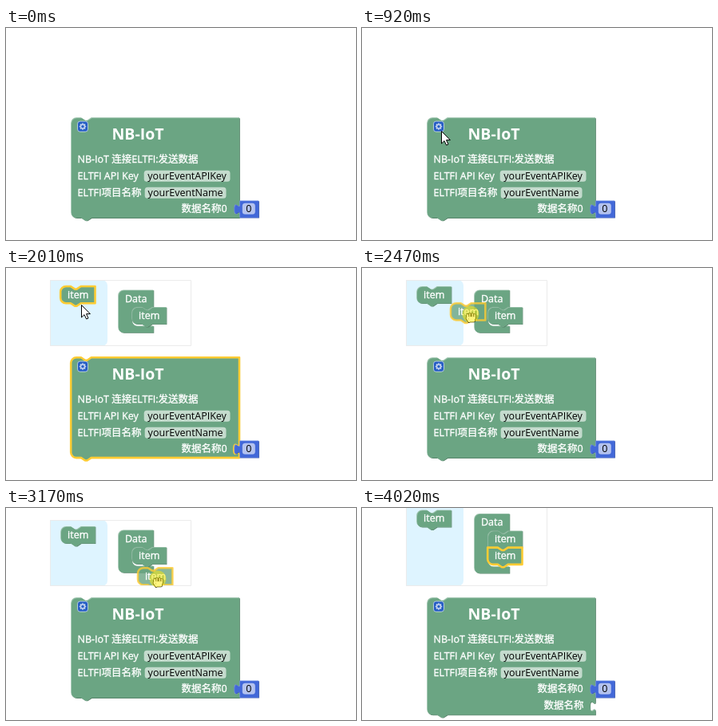
Animation of 438 by 266 pixels, one loop 4720 ms. Source, as an HTML page with a canvas:

```html
<!DOCTYPE html>
<html lang="zh-CN">
<head>
<meta charset="utf-8">
<title>Block mutator</title>
<style>
  html, body { margin: 0; width: 100%; height: 100%; overflow: hidden; background: #fff; }
  canvas { display: block; width: 438px; height: 266px; }
</style>
</head>
<body>
<canvas id="stage"></canvas>
<script>
const WIDTH = 438, HEIGHT = 266, LOOP = 4720, SCALE = 0.85;
const canvas = document.getElementById('stage');
const ctx = canvas.getContext('2d');
const ratio = window.devicePixelRatio || 1;
canvas.width = WIDTH * ratio;
canvas.height = HEIGHT * ratio;

const FAMILY = '"Open Sans", "Noto Sans CJK SC", "Noto Sans CJK", sans-serif';
const GREEN = { fill: '#6ba583', light: '#97c0a8', dark: '#568469' };
const BLUE = { fill: '#4268d8', light: '#6f8de2', dark: '#3453ad' };
const YELLOW = '#fc3';

// Moments at which the picture switches state.
const AT = { hover: 1080, press: 1250, click: 1390, open: 1620, leave: 1850, pick: 2010,
  grab: 2160, drag: 2310, drop: 3400, grow: 3470, arrow: 3550, gone: 4020 };

// Each walk spreads its points evenly from start to end and holds the last one.
const WALKS = [
  { start: 460, end: 920, points: [[270, 221], [226, 196], [181, 172], [138, 151], [108, 138], [92, 132], [99, 129]] },
  { start: 990, end: 1080, points: [[97, 125], [95, 121]] },
  { start: 1850, end: 2010, points: [[99, 95], [97, 66], [94, 46]] },
  { start: 2160, end: 2160, points: [[95, 42]] },
  { start: 2310, end: 2710, points: [[99, 43], [116, 49], [136, 58], [156, 69], [170, 77], [175, 79]] },
  { start: 2860, end: 3320, points: [[177, 80], [182, 84], [188, 89], [192, 92], [190, 89], [187, 85], [186, 84]] },
  { start: 3550, end: 3945, points: [[186, 81], [186, 81], [205, 94], [268, 140], [345, 196], [410, 241]] }
];

function cursorAt(t) {
  const walk = WALKS.filter(w => t >= w.start).pop();
  if (!walk || t >= AT.gone) return null;
  const last = walk.points.length - 1;
  const progress = walk.end > walk.start ? (t - walk.start) / (walk.end - walk.start) : 1;
  return walk.points[Math.min(last, Math.floor(progress * last + 1e-6))];
}

// Outlines in block units, drawn at SCALE.
const NOTCH = 'l6,4 3,0 6,-4', NOTCH_BACK = 'l-6,4 -3,0 -6,-4';
const SOCKET = 'c0,10 -8,-8 -8,7.5 s8,-2.5 8,7.5';
const ROUND_TOP = 'M0,8 A8,8 0 0 1 8,0', ROUND_BOTTOM = 'H8 a8,8 0 0 1 -8,-8 z';

function stackOutline(width, height, { squareTop, squareBottom, right = '' } = {}) {
  return `${squareTop ? 'M0,0' : ROUND_TOP} H15 ${NOTCH} H${width} ${right} V${height} ` +
    `H30 ${NOTCH_BACK} ${squareBottom ? 'H0 z' : ROUND_BOTTOM}`;
}

function containerOutline(count) {
  const floor = 28 + count * 25;
  return `${ROUND_TOP} H52 V25 H50 ${NOTCH_BACK} H28 a8,8 0 0 0 -8,8 V${floor - 8} ` +
    `a8,8 0 0 0 8,8 H52 V${floor + 10} ${ROUND_BOTTOM}`;
}

const VALUE_OUTLINE = 'M0,0 H28 V25 H0 V20 c0,-10 -8,8 -8,-7.5 s8,2.5 8,-7.5 z';

function block(x, y, outline, colour, selected) {
  const path = new Path2D(outline);
  const fill = (style, shift) => {
    ctx.save();
    ctx.translate(shift, shift);
    ctx.fillStyle = style;
    ctx.fill(path);
    ctx.restore();
  };
  ctx.save();
  ctx.translate(x, y);
  ctx.scale(SCALE, SCALE);
  if (selected) {
    fill(colour.fill, 0);
    ctx.strokeStyle = YELLOW;
    ctx.lineWidth = 3;
    ctx.stroke(path);
  } else {
    fill(colour.dark, 1);
    fill(colour.light, 0);
    ctx.clip(path);
    fill(colour.fill, 1);
  }
  ctx.restore();
}

function text(value, x, y, { colour = '#fff', align = 'left', font = '12.5px', weight = 0.35 } = {}) {
  ctx.font = `${font} ${FAMILY}`;
  ctx.fillStyle = ctx.strokeStyle = colour;
  ctx.textAlign = align;
  ctx.fillText(value, x, y);
  if (weight) {
    ctx.lineWidth = weight;
    ctx.lineJoin = 'round';
    ctx.strokeText(value, x, y);
  }
}

function roundRect(x, y, w, h, radii) {
  ctx.beginPath();
  ctx.roundRect(x, y, w, h, radii);
}

function field(value, x, y, width) {
  ctx.fillStyle = 'rgba(255,255,255,.6)';
  roundRect(x, y, width, 14, 3.5);
  ctx.fill();
  text(value, x + width / 2, y + 11.4, { colour: '#000', align: 'center', weight: 0 });
}

function gear(hovered) {
  ctx.save();
  ctx.globalAlpha = hovered ? 1 : 0.65;
  ctx.translate(96, 123.6);
  ctx.fillStyle = hovered ? '#00f' : '#0036e6';
  ctx.strokeStyle = '#fff';
  ctx.lineWidth = 0.9;
  roundRect(-6.5, -6.5, 13, 13, 3.2);
  ctx.fill();
  ctx.stroke();
  ctx.lineWidth = 1.6;
  ctx.beginPath();
  ctx.arc(0, 0, 2.5, 0, Math.PI * 2);
  ctx.stroke();
  ctx.fillStyle = '#fff';
  for (let i = 0; i < 8; i++) {
    ctx.rotate(Math.PI / 4);
    ctx.fillRect(-0.8, -4.3, 1.6, 1.6);
  }
  ctx.restore();
}

function mainBlock(t) {
  const grown = t >= AT.grow;
  const selected = t >= AT.press && t < AT.drag;
  const right = `V128 ${SOCKET}` + (grown ? ` V153 ${SOCKET}` : '');
  block(81.2, 112.3, stackOutline(248, grown ? 173 : 148, { right }), GREEN, selected);
  gear(t >= AT.hover && t < AT.leave);
  text('NB-IoT', 132.5, 140, { font: 'bold 19.5px', weight: 0 });
  text('NB-IoT 连接ELTFI:发送数据', 89.5, 168.7);
  text('ELTFI API Key', 89.5, 190);
  field('yourEventAPIKey', 172.7, 178.8, 107.8);
  text('ELTFI项目名称', 89.5, 211);
  field('yourEventName', 173.7, 199.8, 101.8);
  text('数据名称0', 276.7, 231, { align: 'right' });
  if (grown) text('数据名称', 277.5, 252.3, { align: 'right' });
  block(292.2, 216.5, VALUE_OUTLINE, BLUE);
  field('0', 295.8, 219.8, 16);
}

function item(x, y, { selected, alpha = 1, ...corners } = {}) {
  ctx.save();
  ctx.globalAlpha = alpha;
  block(x, y, stackOutline(51, 25, corners), GREEN, selected);
  ctx.restore();
  text('item', x + 8.9, y + 14.7);
}

function bubble(t, cursor) {
  const shift = t >= AT.grow ? -20.5 : 0;
  const top = 15 + shift, height = 98 - top;
  const dropped = t >= AT.drop;
  ctx.save();
  ctx.fillStyle = '#fff';
  ctx.fillRect(55, top, 177, height);
  ctx.beginPath();
  ctx.rect(55, top, 177, height);
  ctx.clip();
  ctx.fillStyle = '#def4ff';
  roundRect(55, top, 72, height, [0, 7, 7, 0]);
  ctx.fill();

  ctx.translate(0, shift);
  item(68.2, 23, { selected: t >= AT.pick && t < AT.drag });
  block(140.2, 27.4, containerOutline(dropped ? 2 : 1), GREEN);
  text('Data', 149, 42.8);
  item(157.2, 48.9, { squareBottom: dropped });
  if (dropped) {
    item(157.2, 70.1, { selected: true, squareTop: true });
  } else if (t >= AT.drag) {
    item(cursor[0] - 25, cursor[1] - 13.8, { selected: true, alpha: 0.8 });
  }
  ctx.restore();
  ctx.strokeStyle = '#ebebeb';
  ctx.lineWidth = 1;
  ctx.strokeRect(55.5, Math.round(top) + 0.5, 176, 97 - Math.round(top));
}

function arrow() {
  ctx.lineWidth = 1;
  ctx.fillStyle = '#fff';
  ctx.strokeStyle = '#000';
  const shape = new Path2D('M.5,.5 V16 L4,12.6 L6.6,18 L9,17 L6.5,11.6 H11.4 z');
  ctx.fill(shape);
  ctx.stroke(shape);
}

function hand(closed) {
  const fingers = closed
    ? 'M-4.3,-1 V3 M-1.5,-2 V3 M1.5,-2 V3 M4.3,-1 V3 M-5,3 L-2.5,7'
    : 'M-3.4,-4.5 L-2,2 M-.3,-6.4 V2 M2.8,-5.4 L2.3,2 M5.6,-2.3 L4.3,3 M-5.6,1 L-2,6';
  const digits = new Path2D(fingers);
  const palm = new Path2D('M-2.5,2 H4 L3.4,6.5 H-1.2 z');
  ctx.lineCap = ctx.lineJoin = 'round';
  for (const [colour, width] of [['#000', 3.7], ['#fff', 2.2]]) {
    ctx.strokeStyle = ctx.fillStyle = colour;
    ctx.lineWidth = width;
    ctx.stroke(digits);
    ctx.stroke(palm);
    ctx.fill(palm);
  }
  ctx.strokeStyle = '#000';
  ctx.lineWidth = 0.6;
  ctx.stroke(new Path2D('M-1.3,-2 V1 M1.1,-2 V1 M3.5,-1 V1'));
}

function pointer(t, [x, y]) {
  const pressed = (t >= AT.press && t < AT.click) || (t >= AT.grab && t < AT.drop);
  const dragging = t >= AT.drag && t < AT.drop;
  ctx.save();
  ctx.translate(x, y);
  ctx.save();
  if (dragging) {
    ctx.translate(0.5, 2);
    hand(true);
  } else if (t >= AT.drop && t < AT.arrow) {
    hand(false);
  } else {
    arrow();
  }
  ctx.restore();
  if (pressed) {
    ctx.fillStyle = 'rgba(255,235,0,.5)';
    ctx.beginPath();
    ctx.arc(0, 0, 10.5, 0, Math.PI * 2);
    ctx.fill();
  }
  ctx.restore();
}

function draw(t) {
  const cursor = cursorAt(t);
  ctx.setTransform(ratio, 0, 0, ratio, 0, 0);
  ctx.fillStyle = '#fff';
  ctx.fillRect(0, 0, WIDTH, HEIGHT);
  mainBlock(t);
  if (t >= AT.open) bubble(t, cursor);
  if (cursor) pointer(t, cursor);
}

const begin = performance.now();
function tick() {
  draw((performance.now() - begin) % LOOP);
  requestAnimationFrame(tick);
}
tick();
</script>
</body>
</html>
```
